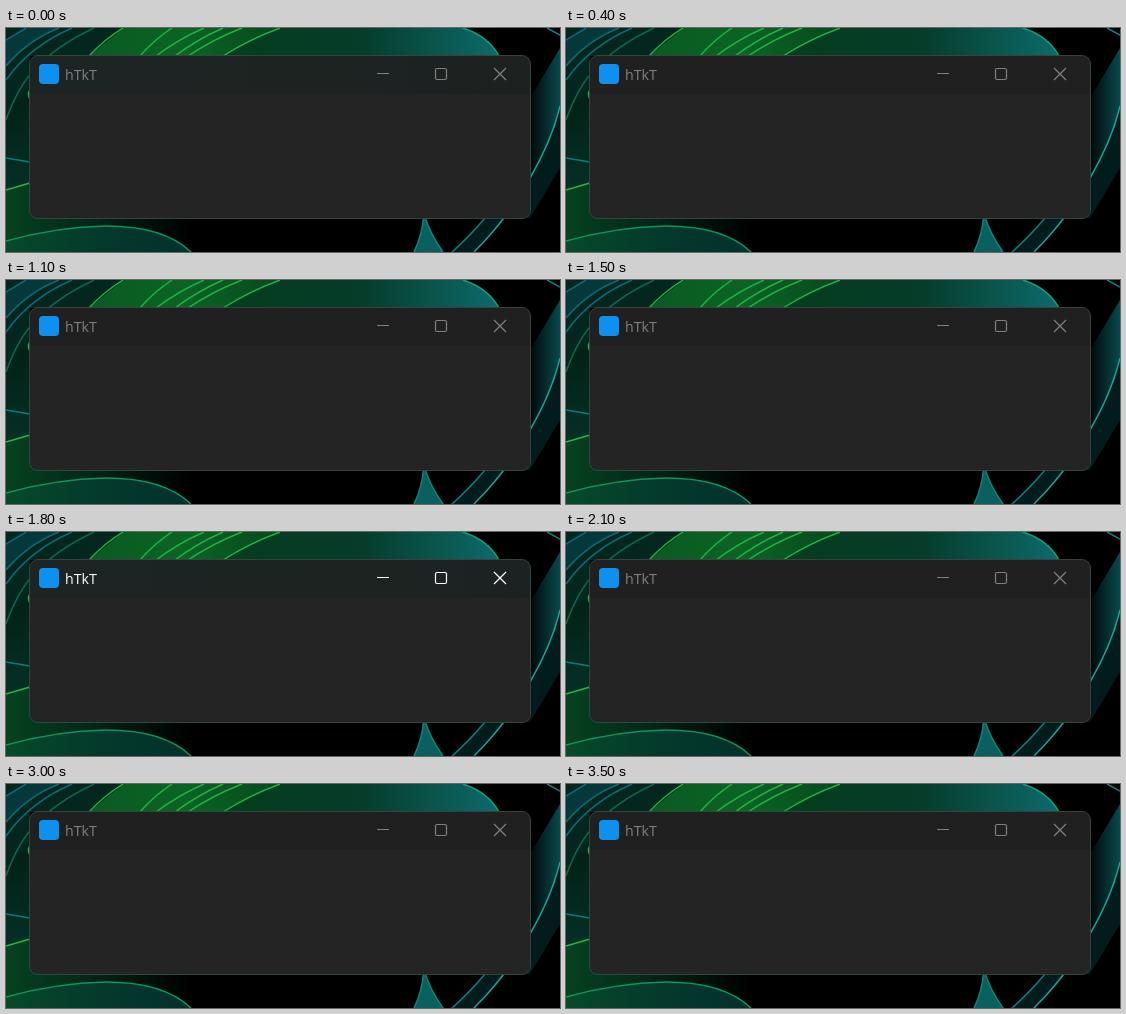
Recreate the animation shown at these times as an HTML page. Size 554 by 224 pixels, loop 3600 ms.

```html
<!DOCTYPE html>
<html lang="en">
<head>
<meta charset="utf-8">
<title>Window flash</title>
<style>
  html, body { margin: 0; width: 100%; height: 100%; overflow: hidden; background: #000; }
  svg { display: block; width: 554px; height: 224px; }
  text { font: 14.2px "Open Sans", "Noto Sans", sans-serif; }
</style>
</head>
<body>
<svg viewBox="0 0 554 224" fill="none">
  <defs>
    <linearGradient id="leaf" x1="0" y1="0" x2="1" y2="0">
      <stop offset="0" stop-color="#0b5a22"/>
      <stop offset=".5" stop-color="#0a6424"/>
      <stop offset="1" stop-color="#08481f"/>
    </linearGradient>
    <linearGradient id="petal" x1="0" y1="0" x2="1" y2="0">
      <stop offset="0" stop-color="#053d1e"/>
      <stop offset=".5" stop-color="#053c2a"/>
      <stop offset=".8" stop-color="#0a5850"/>
      <stop offset="1" stop-color="#0d6a6c"/>
    </linearGradient>
    <linearGradient id="side" x1="0" y1="0" x2="0" y2="1">
      <stop offset="0" stop-color="#022016"/>
      <stop offset=".6" stop-color="#032a1f"/>
      <stop offset="1" stop-color="#043026"/>
    </linearGradient>
    <linearGradient id="lower" x1="0" y1="0" x2="1" y2="0">
      <stop offset="0" stop-color="#06421f"/>
      <stop offset=".4" stop-color="#032a1a"/>
      <stop offset="1" stop-color="#000"/>
    </linearGradient>
    <linearGradient id="mound" x1="0" y1="0" x2="1" y2="0">
      <stop offset="0" stop-color="#054a2a"/>
      <stop offset=".5" stop-color="#043a2c"/>
      <stop offset="1" stop-color="#03302c"/>
    </linearGradient>
    <linearGradient id="right" x1="0" y1="0" x2="1" y2="0">
      <stop offset="0" stop-color="#010808"/>
      <stop offset="1" stop-color="#07494c"/>
    </linearGradient>
    <linearGradient id="mica" x1="0" y1="0" x2="1" y2="0">
      <stop offset="0" stop-color="#1c2524"/>
      <stop offset=".5" stop-color="#1c2422"/>
      <stop offset="1" stop-color="#1c2221"/>
    </linearGradient>
    <clipPath id="frame"><rect x="24" y="28" width="500" height="162" rx="8"/></clipPath>
  </defs>

  <!-- wallpaper -->
  <path d="M0 0H117L83 28H24V64L0 90Z" fill="#03261f"/>
  <path d="M0 38Q22 12 53 0H20L0 12Z" fill="#04383a"/>
  <path d="M83 28L117 0H274Q244 10 217 28Z" fill="url(#leaf)"/>
  <path d="M217 28Q244 10 274 0H457Q482 8 493 28Z" fill="url(#petal)"/>
  <path d="M32 64Q8 66 0 90V162L32 153Z" fill="url(#side)"/>
  <path d="M0 162L32 153V186H185V224H0Z" fill="url(#lower)"/>
  <path d="M0 213Q50 199 100 198Q158 198 185 224H0Z" fill="url(#mound)"/>
  <path d="M554 20V78Q546 112 524 150V70Z" fill="url(#right)"/>
  <path d="M554 78Q546 112 524 150L500 190L468 224H446L479 190H524L554 140Z" fill="#021c1d"/>
  <path d="M418 186Q416 208 408 224H437Q424 206 418 186Z" fill="#0b5f5e"/>
  <g id="lines" stroke="#22b545" stroke-width="1.4"></g>
  <g stroke-width="1.5">
    <path d="M0 12L20 0M0 38Q22 12 53 0M0 52Q24 18 66 0" stroke="#0d6c78"/>
    <path d="M0 92Q12 58 30 40Q50 18 88 0" stroke="#0c6a4a"/>
    <path d="M0 130L24 134" stroke="#0c7c80"/>
    <path d="M24 62Q21 66 24 71M0 162L24 155" stroke="#2bb54c"/>
    <path d="M0 213Q50 199 100 198Q158 198 185 224" stroke="#13935a"/>
    <path d="M457 0Q482 8 493 28" stroke="#12a07a"/>
    <path d="M418 186Q416 208 408 224M418 186Q424 206 437 224" stroke="#0d8478"/>
    <path d="M541 0L554 7M479 190Q464 208 446 224" stroke="#0c7f7c"/>
    <path d="M554 78Q546 112 524 150Q502 190 468 224" stroke="#1ba597"/>
  </g>

  <!-- window -->
  <g clip-path="url(#frame)">
    <path d="M24 28H524V190H24Z" fill="#242424"/>
    <path d="M24 28H524V66H24Z" fill="#202020"/>
    <path id="tint" d="M24 28H524V66H24Z" fill="url(#mica)"/>
  </g>
  <rect x="23.5" y="27.5" width="501" height="163" rx="8.5" stroke="#34443f"/>
  <rect x="33" y="36" width="20" height="20" rx="4" fill="#0d90ee"/>
  <g id="caption">
    <text x="59" y="52" fill="currentColor">hTkT</text>
    <g stroke="currentColor" stroke-width="1.2">
      <path d="M371 45.5H383M488 40L500 52M500 40L488 52"/>
      <rect x="429.5" y="40.5" width="11" height="11" rx="1.5"/>
    </g>
  </g>
</svg>
<script>
  const LOOP = 3600, STEP = 100;
  const PERIOD = 218.75, FIRST = 2, COUNT = 10, DELAY = 0.07;
  const $ = id => document.getElementById(id);

  // Ribbon edges fanning out across the top
  $("lines").innerHTML = [[83, 117], [134, 166], [150, 198], [169, 217], [182, 236], [217, 274]]
    .map(([a, b]) => `<path d="M${a} 28Q${a + (b - a) * 0.47} 11 ${b} 0"/>`).join("");

  function isActive(t) {
    const cycle = t / PERIOD - DELAY;
    const index = Math.floor(cycle);
    return index >= FIRST && index < FIRST + COUNT && cycle - index < 0.5;
  }

  function draw(now) {
    const t = Math.floor(now % LOOP / STEP) * STEP;
    const active = isActive(t);
    $("caption").style.color = active ? "#fff" : "#808080";
    // The tint fades out after the window loses focus
    $("tint").style.opacity = active ? 1 : Math.max(0, 0.85 - t / 200);
    requestAnimationFrame(draw);
  }
  draw(0);
</script>
</body>
</html>
```
